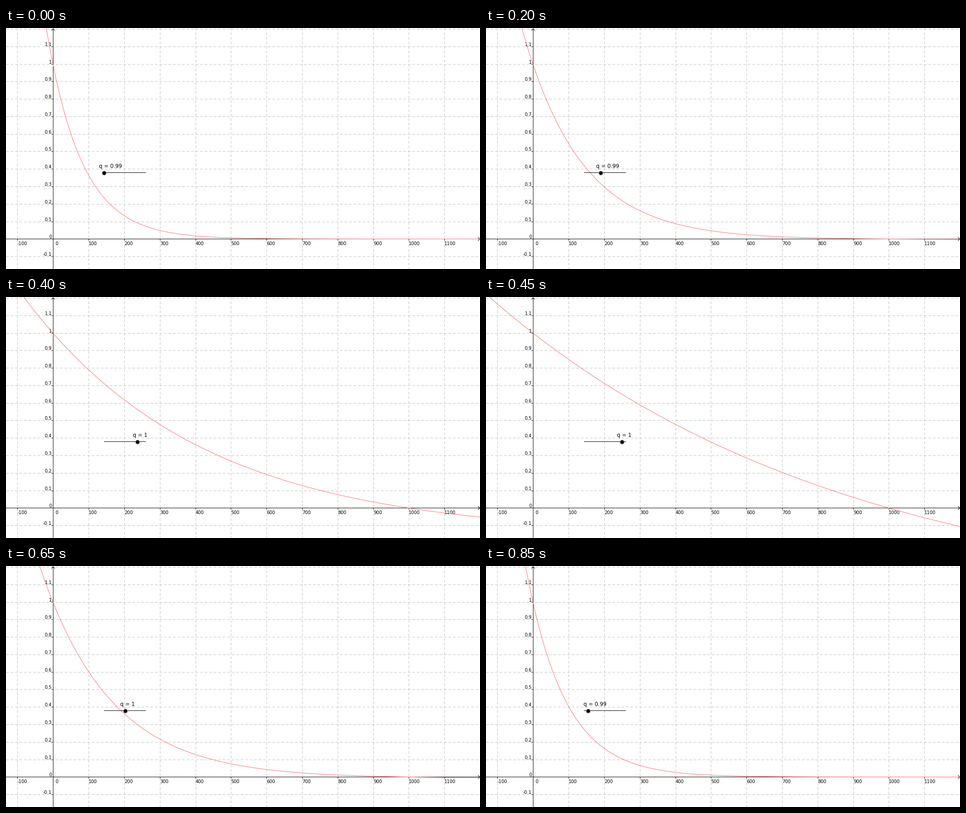
A matplotlib script for the animation above (900 ms loop, 1050 px wide and 534 px high).

```python
import numpy as np
import matplotlib.pyplot as plt
from matplotlib.animation import FuncAnimation

W, H, DPI = 1050, 534, 100
PX = 72 / DPI                   # points per pixel
X0, DX = 104.25, 78.82          # origin and pixels per 100 units
Y0, DY = 467.3, 38.78           # origin and pixels per 0.1
FRAMES, INTERVAL = 18, 50
RAIL_L, RAIL_R, RAIL_Y = 217, 310, 320.5

plt.rcParams["font.family"] = "DejaVu Sans"
fig = plt.figure(figsize=(W / DPI, H / DPI), dpi=DPI, facecolor="white")
ax = fig.add_axes([0, 0, 1, 1])
ax.set_xlim(0, W)
ax.set_ylim(H, 0)
ax.axis("off")


def line(xs, ys, color="black", width=1, **kw):
    return ax.plot(xs, ys, color=color, lw=width * PX, snap=False,
                   solid_capstyle="butt", **kw)[0]


def label(x, y, text, size=10, **kw):
    return ax.text(x, y, text, fontsize=size * PX, va="baseline", **kw)


def col(k):
    return round(X0 + DX * k) + 0.5


def row(k):
    return round(Y0 - DY * k) + 0.5


def grid_line(xs, ys):
    line(xs, ys, "#c0c0c0", dashes=(6, 4), dash_capstyle="butt", zorder=1)


ox, oy = col(0), row(0)

for k in range(-1, 12):
    x = col(k)
    if k:
        grid_line([x, x], [0, H])
        line([x, x], [oy, oy + 3.5], zorder=2)
    label(x + (4.5 if k == 0 else -0.5), 481, str(100 * k), zorder=2)

for k in range(-1, 13):
    y = row(k)
    if k:
        grid_line([0, W], [y, y])
    if k < 12:
        line([ox - 3.5, ox], [y, y], zorder=2)
        label(101.5, y - 1.5, f"{k / 10:g}", ha="right", zorder=2)

# Axes with open arrowheads
line([0, W], [oy, oy], zorder=2)
line([ox, ox], [1, H], zorder=2)
line([W - 4.5, W - 0.5, W - 4.5], [oy - 4, oy, oy + 4], zorder=2)
line([ox - 4, ox, ox + 4], [5.5, 1.5, 5.5], zorder=2)

u = np.linspace(-140, 1210, 1200)
curve = line(X0 - 0.4 + DX * u / 100, u * 0, "#ff6c6c", zorder=3)

line([RAIL_L, RAIL_R], [RAIL_Y, RAIL_Y], zorder=4)
knob = line([RAIL_L], [RAIL_Y], marker="o", ms=8.4 * PX, mfc="black",
            mec="#6e6565", mew=1.3 * PX, zorder=5)
value = label(0, 310, "", 11.8, zorder=6)


def update(i):
    step = min(i, FRAMES - i)
    q = 0.99 + step / 1000
    end = q ** 1000
    curve.set_ydata(oy - 10 * DY * (q ** u - end) / (1 - end))
    x = RAIL_L + (RAIL_R - RAIL_L) * step / 10
    knob.set_xdata([x])
    value.set_x(x - 10.5)
    value.set_text("q = 0.99" if step < 5 else "q = 1")
    return curve, knob, value


anim = FuncAnimation(fig, update, frames=FRAMES, interval=INTERVAL,
                     init_func=lambda: update(0), repeat=True)
plt.show()
```
